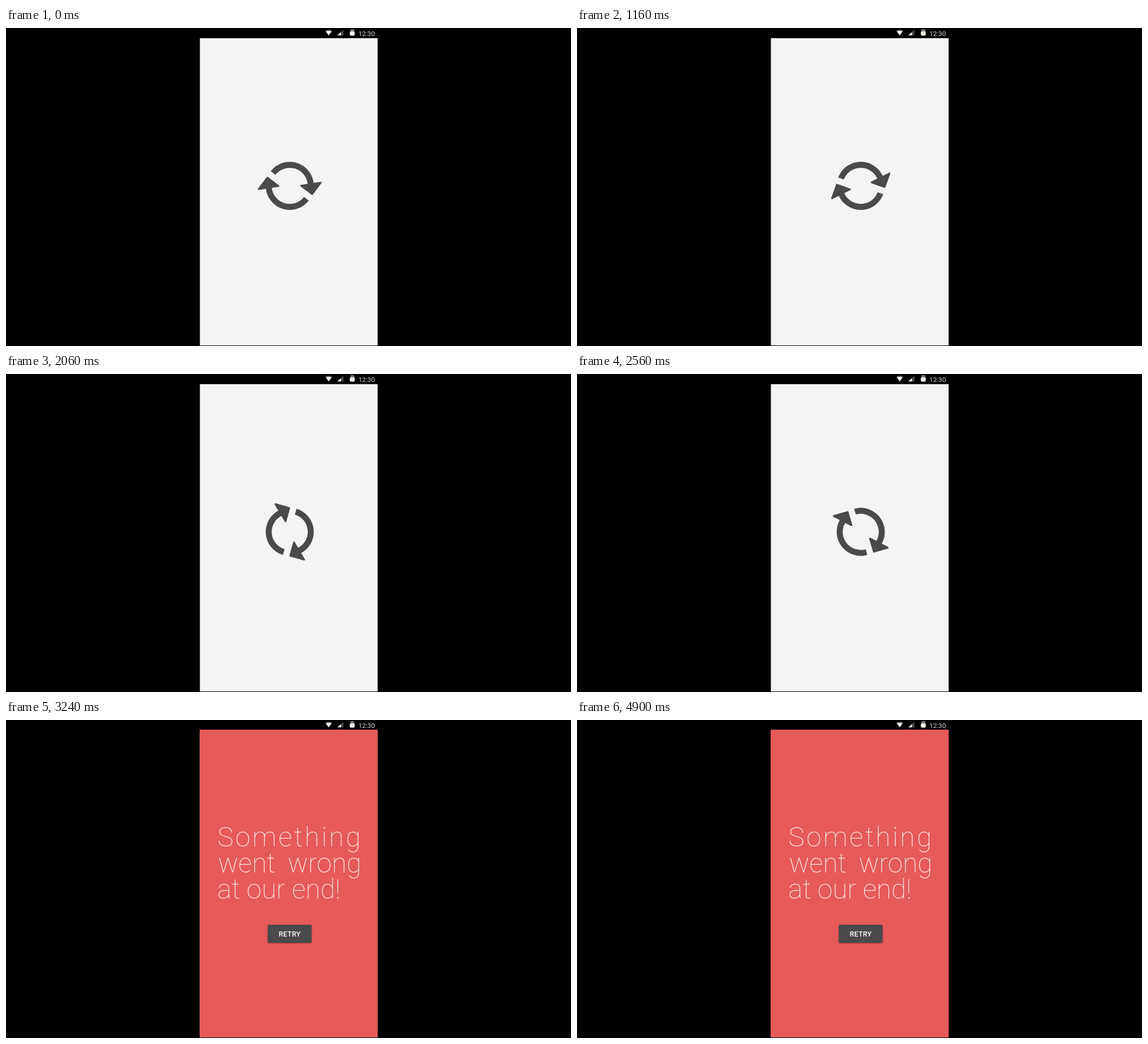
Recreate the animation shown at these times as an HTML page. Size 998x561 px, loop 4920 ms.

```html
<!DOCTYPE html>
<html lang="en">
<head>
<meta charset="utf-8">
<title>Loading and error screen</title>
<style>
  html, body { margin: 0; width: 100%; height: 100%; overflow: hidden; background: #000; }
  svg { display: block; width: 100%; height: 100%; }
  text { font-family: Roboto, "Open Sans", sans-serif; }
  .clock { font-size: 11.7px; fill: #dcdcdc; }
  .message { font-size: 47.8px; font-weight: 200; fill: #fdf0ee; }
  .spaced { letter-spacing: 3.5px; }
  .label { font-size: 12.3px; font-weight: 500; letter-spacing: .4px; fill: #fff; }
  .button { filter: drop-shadow(0 1px 1px rgba(0, 0, 0, .4)); }
</style>
</head>
<body>
<svg viewBox="0 0 998 561">
  <defs>
    <g id="arrow">
      <path d="M-29.8 -22.2A37.2 37.2 0 0 1 37.1 -2.6" fill="none" stroke="#4a4a4a" stroke-width="10.6"/>
      <path d="M20 -.6L54.8 -6.8L39.8 13.8Z" fill="#4a4a4a" stroke="#4a4a4a" stroke-width="3" stroke-linejoin="round"/>
    </g>
  </defs>
  <rect width="998" height="561"/>

  <g id="loading">
    <rect x="342.5" y="18" width="314" height="542" fill="#f4f4f4"/>
    <g id="spinner">
      <use href="#arrow"/>
      <use href="#arrow" transform="rotate(180)"/>
    </g>
  </g>

  <g id="error">
    <rect x="342" y="17" width="314.6" height="543" fill="#e65a5a"/>
    <g class="message">
      <text class="spaced" x="373.4" y="223.3">Something</text>
      <text x="374.2" y="269.3">went</text>
      <text x="627.8" y="269.3" text-anchor="end">wrong</text>
      <text x="373.3" y="315.3">at our end!</text>
    </g>
    <rect class="button" x="462.5" y="361.3" width="77.2" height="31.7" rx="1.5" fill="#4a4a4a"/>
    <text class="label" x="501.2" y="382.3" text-anchor="middle">RETRY</text>
  </g>

  <g id="status">
    <path d="M563.5 4.5Q570 .8 576.5 4.5L570 13Z" fill="#4c4c4c"/>
    <path d="M565 6Q570 4 575 6L570 13Z" fill="#fff"/>
    <path d="M585.5 13L596 3V13Z" fill="#4c4c4c"/>
    <path d="M585.5 13L591.5 7.3V13Z" fill="#fff"/>
    <rect x="608" y="2" width="7.5" height="8" rx="2.5" fill="#777"/>
    <rect x="607.3" y="6" width="8.7" height="7.6" rx="2.5" fill="#f0f0e6"/>
    <text class="clock" x="622.4" y="13.6">12:30</text>
  </g>
</svg>
<script>
  const LOOP = 4920, STEP = 20;
  const FAIL_AT = 3000;   // the error screen replaces the spinner at once
  const SPEED = 0.2955;   // degrees per ms

  const spinner = document.getElementById("spinner");
  const loading = document.getElementById("loading");
  const error = document.getElementById("error");

  const show = (node, on) => node.setAttribute("visibility", on ? "visible" : "hidden");

  function draw(time) {
    const t = Math.floor(time % LOOP / STEP) * STEP;
    const failed = t >= FAIL_AT;
    show(loading, !failed);
    show(error, failed);
    spinner.setAttribute("transform", `translate(501.2 278.5) rotate(${t * SPEED + 1})`);
  }

  const start = performance.now();
  function tick(now) {
    draw(Math.max(0, now - start));
    requestAnimationFrame(tick);
  }
  draw(0);
  requestAnimationFrame(tick);
</script>
</body>
</html>
```
